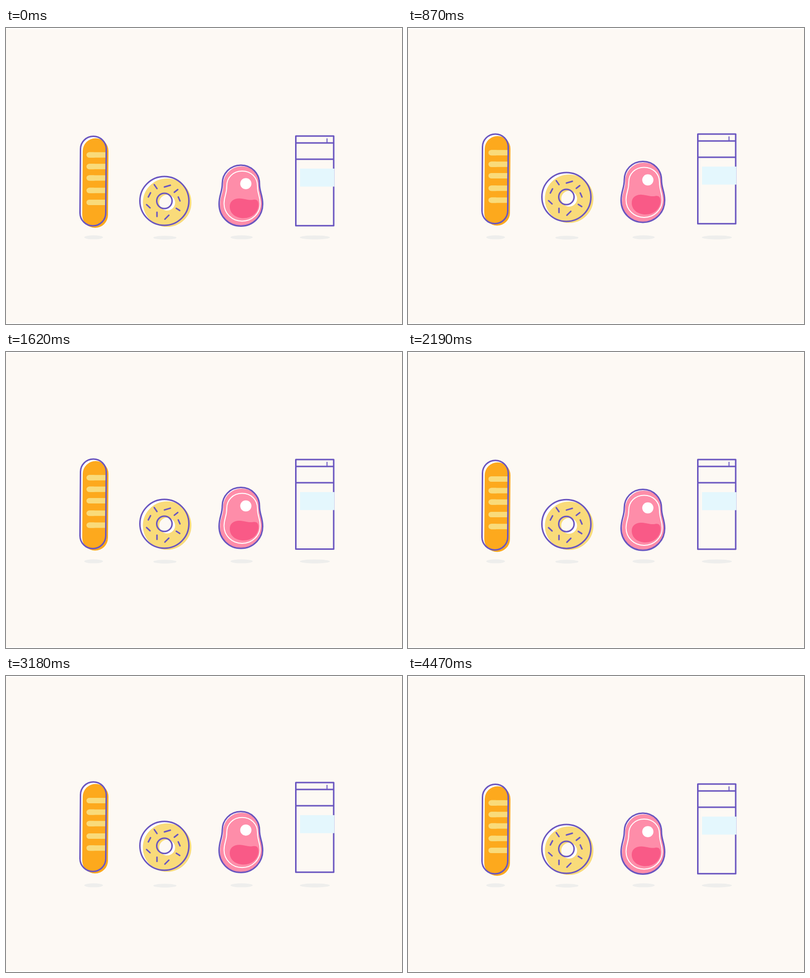
Animation of 800x600 px, one loop 4.5 s. Source, as an HTML page:

```html
<!DOCTYPE html>
<html lang="en">
<head>
<meta charset="utf-8">
<title>Floating food</title>
<style>
  html, body { margin: 0; width: 100%; height: 100%; overflow: hidden; background: #fff; }
  svg { display: block; }
  .line { fill: none; stroke: #6a56c0; stroke-width: 3; stroke-linecap: round; stroke-linejoin: round; }
</style>
</head>
<body>
<svg width="800" height="600" viewBox="0 0 800 600">
  <defs>
    <path id="pill" d="M150.5 245.5A26 26 0 0 1 202.5 245.5L201.5 375A26 26 0 0 1 149.5 375Z"/>
    <path id="steak" d="M474.5 278C497 278 512 296 512 315C512 333 518.5 338 518.5 357C518.5 382 499 401.5 474.5 401.5S430.5 382 430.5 357C430.5 338 437 333 437 315C437 296 452 278 474.5 278Z"/>
    <clipPath id="steakClip"><use href="#steak"/></clipPath>
  </defs>
  <rect y="2" width="800" height="596" fill="#fdf9f4"/>

  <g fill="#eeeeec">
    <ellipse cx="177" cy="424.3" rx="19" ry="4"/>
    <ellipse cx="321" cy="425" rx="23.5" ry="3.7"/>
    <ellipse cx="476" cy="424.3" rx="22.5" ry="4"/>
    <ellipse cx="624" cy="424.5" rx="30.5" ry="4"/>
  </g>

  <g id="bread">
    <use href="#pill" fill="#fff"/>
    <use href="#pill" x="4.5" y="4" fill="#fda91d"/>
    <path fill="none" stroke="#f9db7a" stroke-width="11" d="M168 257.3h33M168 280.8h33M168 304h33M168 329.3h33M168 353.5h33"/>
    <path fill="none" stroke="#f9db7a" stroke-width="11" stroke-linecap="round" d="M168 257.3h9M168 280.8h9M168 304h9M168 329.3h9M168 353.5h9"/>
    <use href="#pill" class="line"/>
  </g>

  <g id="donut">
    <circle cx="320" cy="350.5" r="49.5" fill="#fff"/>
    <circle cx="320" cy="350.5" r="15.5" fill="#fdf9f4"/>
    <circle cx="325.5" cy="354" r="32.5" fill="none" stroke="#f9db7a" stroke-width="33"/>
    <circle cx="320" cy="350.5" r="49.5" class="line"/>
    <circle cx="320" cy="350.5" r="15.5" class="line"/>
    <path class="line" stroke-width="2.5" d="M299.5 317.5L305 325.5M320 322.3L332 318.8M340 333L347 327.5M292 334L287.5 342.5M348 342.5L351.5 350.5M284 358L291 364.5M344 365.5L351 370M305 373.5V382M321 387.5L329 379.5"/>
  </g>

  <g id="meat">
    <use href="#steak" fill="#fff"/>
    <g clip-path="url(#steakClip)"><use href="#steak" x="2" y="2.5" fill="#fe8da9"/></g>
    <path fill="#f95a87" d="M452 362C452 350 462 345 472 345.5C484 346 490 350 500 348C508 347 510 352 510 358C510 374 497 385.5 480 385.5C464 385.5 452 376 452 362Z"/>
    <path fill="none" stroke="#fff" stroke-width="2" d="M477 290C495 290 508 303 508 320C508 337 513.5 341 513.5 356C513.5 376 497 391.5 477 391.5S440.5 376 440.5 356C440.5 341 446 337 446 320C446 303 459 290 477 290Z"/>
    <circle cx="484.5" cy="315.5" r="11.3" fill="#fff"/>
    <use href="#steak" class="line"/>
  </g>

  <g id="carton">
    <path class="line" d="M585.5 219H662V400.7H585.5ZM585.5 233H662M585.5 266H662"/>
    <path class="line" style="stroke-width:2" d="M648.5 224.5V232"/>
    <rect x="594" y="285" width="69.5" height="36.5" fill="#e4f7fd"/>
  </g>
</svg>
<script>
  const LOOP = 4500;

  // Vertical offsets as [time, y] pairs, eased in and out between them.
  const bobs = {
    bread: [[0, 0], [1080, -5], [2180, 0.2], [3340, -5], [LOOP, 0]],
    donut: [[0, 0], [930, -8.1], [1900, -0.8], [2950, -6.8], [4230, 0], [LOOP, 0]],
    meat: [[0, 0], [890, -7.6], [2350, 0.7], [3340, -3.4], [4260, 0], [LOOP, 0]],
    carton: [[0, 0], [930, -4.1], [1900, -0.4], [2950, -3.2], [4230, 0], [LOOP, 0]]
  };

  function offsetAt(keys, t) {
    const i = keys.findIndex(key => t < key[0]);
    const [t0, y0] = keys[i - 1], [t1, y1] = keys[i];
    const ease = (1 - Math.cos(Math.PI * (t - t0) / (t1 - t0))) / 2;
    return y0 + (y1 - y0) * ease;
  }

  function draw() {
    const t = performance.now() % LOOP;
    for (const id in bobs) {
      document.getElementById(id).setAttribute("transform", `translate(0 ${offsetAt(bobs[id], t)})`);
    }
    requestAnimationFrame(draw);
  }
  draw();
</script>
</body>
</html>
```
